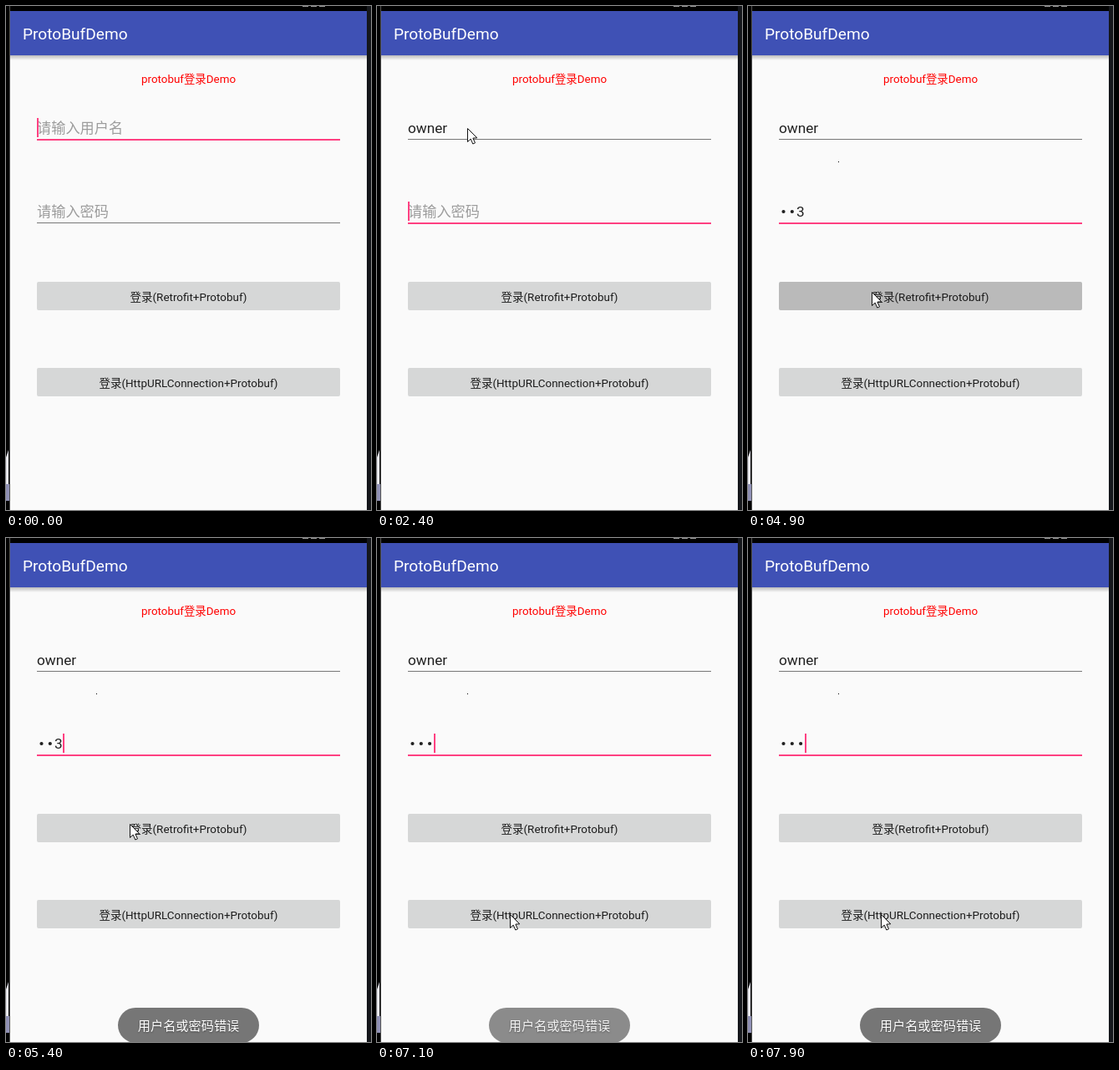
Recreate the animation shown at these times as an HTML page with a canvas. Size 437 by 603 pixels, loop 8 s.

```html
<!DOCTYPE html>
<html lang="zh-CN">
<head>
<meta charset="utf-8">
<title>ProtoBufDemo</title>
<style>
html, body { margin: 0; width: 100%; height: 100%; overflow: hidden; background: #000; }
canvas { display: block; width: 437px; height: 603px; }
</style>
</head>
<body>
<canvas id="stage" width="437" height="603"></canvas>
<script>
const LOOP = 8000, STEP = 100;
const PINK = '#ff4081', INK = '#212121', HINT = '#9c9c9c', PAPER = '#fafafa';
const USER = 'owner';
const MID = 218.5;
const ctx = document.getElementById('stage').getContext('2d');

// 0 before a, 1 after b, linear between
const ramp = (t, a, b) => Math.min(1, Math.max(0, (t - a) / (b - a)));
const blink = (t, since) => (t - since) % 1000 < 500;

function rect(x, y, w, h, color) {
  ctx.fillStyle = color;
  ctx.fillRect(x, y, w, h);
}

function poly(points, color) {
  ctx.beginPath();
  points.forEach(([x, y]) => ctx.lineTo(x, y));
  ctx.closePath();
  ctx.fillStyle = color;
  ctx.fill();
}

function round(x, y, w, h, r, color) {
  ctx.beginPath();
  ctx.roundRect(x, y, w, h, r);
  ctx.fillStyle = color;
  ctx.fill();
}

function shadow(color, blur, dy) {
  ctx.shadowColor = color;
  ctx.shadowBlur = blur;
  ctx.shadowOffsetY = dy;
}

function text(s, x, y, size, color, align = 'left') {
  ctx.font = `${size}px Roboto, "Noto Sans CJK SC", "Noto Sans CJK", sans-serif`;
  ctx.textAlign = align;
  ctx.fillStyle = color;
  ctx.fillText(s, x, y);
  return ctx.measureText(s).width;
}

function frame() {
  rect(0, 0, 437, 603, '#000');
  rect(4, 0, 1, 603, '#555');
  rect(432, 0, 5, 603, '#15171b');
  for (let i = 0; i < 3; i++) rect(355 + i * 10, 0, 7, 1, '#999');
  poly([[0, 540], [3, 531], [3, 572], [0, 572]], '#e8e8f0');
  rect(0, 572, 4, 20, '#8f90b4');
  rect(5, 6, 427, 597, PAPER);
  const shade = ctx.createLinearGradient(0, 59, 0, 65);
  shade.addColorStop(0, 'rgba(0,0,0,.25)');
  shade.addColorStop(1, 'rgba(0,0,0,0)');
  rect(5, 59, 427, 6, shade);
  rect(5, 6, 427, 53, '#3f51b5');
  text('ProtoBufDemo', 20, 40, 19.1, '#fff');
  text('protobuf登录Demo', MID, 92, 13.4, '#f00', 'center');
}

function line(y, focused) {
  rect(37, y, 363, focused ? 2 : 1, focused ? PINK : '#777');
}

function caret(x, y) {
  rect(Math.round(x), y, 2, 23, PINK);
}

function userField(t) {
  const typed = USER.slice(0, Math.max(0, (t - 1500) / 100));
  let end = 37;
  if (typed) end += text(typed, 37, 152, 17.2, INK);
  else text('请输入用户名', 37, 152, 17.2, HINT);
  const focused = t < 2400;
  line(159, focused);
  if (focused && (typed || blink(t, -100))) caret(end, 134);
}

function passField(t) {
  const keys = [3700, 4000, 4200].filter(at => t >= at);
  const n = keys.length, masked = t >= 5700;
  if (!n) text('请输入密码', 37, 252, 17.2, HINT);
  for (let i = 0; i < n; i++) {
    const x = 37.5 + i * 10.3;
    if (i === n - 1 && !masked) text(String(n), x, 252, 17.2, INK);
    else round(x + 2.9, 243.9, 4.2, 4.2, 2.1, INK);
  }
  const focused = t >= 2400;
  line(259, focused);
  // The caret restarts on each key and stops blinking behind the dialog
  const since = t >= 5000 ? 5000 : n ? keys[n - 1] : 2400;
  if (focused && (t >= 7000 || blink(t, since))) caret(37 + n * 10.4, 234);
}

function button(t, y, label, pressAt) {
  const press = t < pressAt ? 0 : 1 - ramp(t, pressAt + 100, pressAt + 300);
  round(37, y, 363, 34, 2, '#d6d7d7');
  round(37, y, 363, 34, 2, `rgba(0,0,0,${0.135 * press})`);
  text(label, MID, y + 23, 13.45, '#1c1c1c', 'center');
}

function dialog(t) {
  const alpha = 0.38 * Math.max(0, 1 - Math.abs(t - 7650) / 250);
  if (!alpha) return;
  ctx.save();
  ctx.globalAlpha = alpha;
  // Keep the shadow outside the translucent panel
  ctx.save();
  ctx.beginPath();
  ctx.rect(0, 0, 437, 603);
  ctx.roundRect(43, 300, 350, 71, 2);
  ctx.clip('evenodd');
  shadow('rgba(0,0,0,.7)', 7, 2);
  round(43, 300, 350, 71, 2, PAPER);
  ctx.restore();
  round(43, 300, 350, 71, 2, PAPER);
  const a = (t - 7600) / 160 - 1.5;
  ctx.beginPath();
  ctx.arc(79.5, 335.5, 15, a, a + 3.4);
  ctx.lineWidth = 2;
  ctx.strokeStyle = '#aaa';
  ctx.stroke();
  text('登陆中，请稍后', 114.5, 340.5, 12.3, '#444');
  ctx.restore();
}

function toast(t, from, to) {
  const alpha = ramp(t, from, from + 200) * (1 - ramp(t, to - 400, to + 800));
  if (!alpha || t >= to + 200) return;
  ctx.save();
  ctx.globalAlpha = alpha;
  round(134, 562, 169, 42, 21, '#767676');
  ctx.globalAlpha = Math.sqrt(alpha);
  shadow('rgba(0,0,0,.4)', 2, 1);
  text('用户名或密码错误', MID, 589, 15.2, '#fff', 'center');
  ctx.restore();
}

function pointer(t) {
  if (t >= 4200) rect(108, 186, 1, 1, '#000');
  if (t < 400) return;
  let x = 330, y = 111;
  const glide = (a, b, toX, toY) => {
    const k = ramp(t, a, b);
    x += (toX - x) * k;
    y += (toY - y) * k;
  };
  glide(400, 900, 108, 146);
  glide(2600, 3400, 120, 269);
  glide(3500, 4000, 108, 186);
  glide(4100, 4700, 148, 342);
  glide(5600, 6100, 159, 450);
  ctx.save();
  ctx.translate(Math.round(x) + .5, Math.round(y) + .5);
  poly([[0, 0], [0, 16], [3.7, 12.6], [6.3, 18.5], [9, 17.3], [6.4, 11.6], [11.3, 11.3]], '#fff');
  ctx.lineWidth = 1;
  ctx.strokeStyle = '#111';
  ctx.stroke();
  ctx.restore();
}

function draw(now) {
  const t = Math.floor(now % LOOP / STEP) * STEP;
  frame();
  userField(t);
  passField(t);
  button(t, 330, '登录(Retrofit+Protobuf)', 4900);
  button(t, 433, '登录(HttpURLConnection+Protobuf)', 7300);
  dialog(t);
  toast(t, 5200, 7300);
  toast(t, 7700, 9800);
  pointer(t);
}

const start = performance.now();
function tick() {
  draw(performance.now() - start);
  requestAnimationFrame(tick);
}
tick();
</script>
</body>
</html>
```
